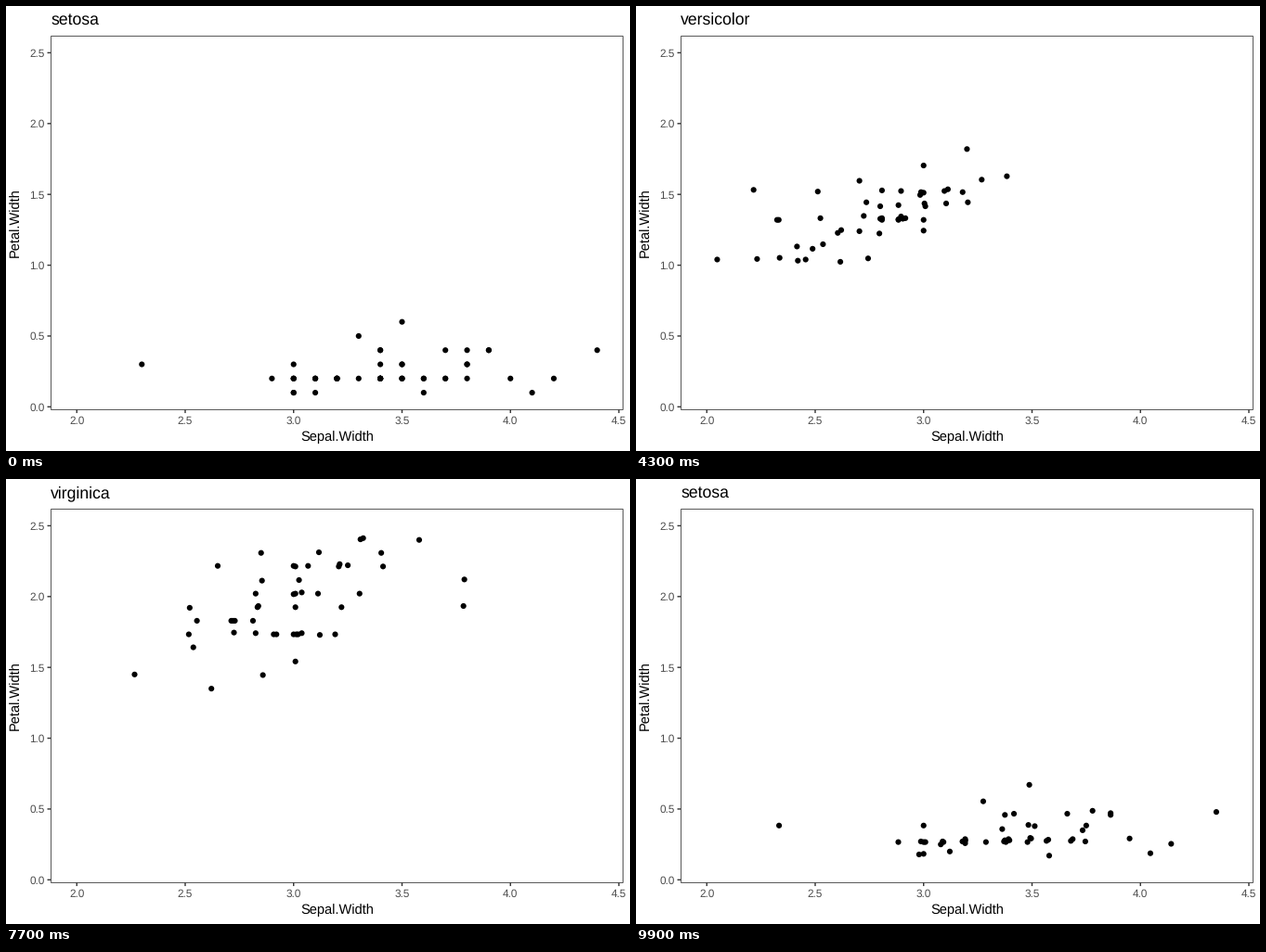
Recreate the animation shown at these times as a matplotlib script. Size 672 px wide and 480 px high, loop 10000 ms.

```python
import numpy as np
import matplotlib.pyplot as plt
from matplotlib.animation import FuncAnimation
from matplotlib.patches import Rectangle

plt.rcParams["font.family"] = "Liberation Sans"
plt.rcParams["text.hinting"] = "none"

W, H, DPI = 672, 480, 96
LEFT, RIGHT, TOP, BOTTOM = 48.2, 664.67, 32.1, 435.4
X0, X1, Y0, Y1 = 1.88, 4.52, -0.02, 2.62
FRAMES, HOLD = 100, 9
# first frame, length and species at both ends of each transition
MOVES = [(8, 25, 0, 1), (42, 25, 1, 2), (76, 24, 2, 0)]
NAMES = ["setosa", "versicolor", "virginica"]

# sepal and petal widths in tenths, one flower per column
setosa = np.array([
    [35, 30, 32, 31, 36, 39, 34, 34, 29, 31, 37, 34, 30, 30, 40, 44, 39,
     35, 38, 38, 34, 37, 36, 33, 34, 30, 34, 35, 34, 32, 31, 34, 41, 42,
     31, 32, 35, 36, 30, 34, 35, 23, 32, 35, 38, 30, 38, 32, 37, 33],
    [2, 2, 2, 2, 2, 4, 3, 2, 2, 1, 2, 2, 1, 1, 2, 4, 4,
     3, 3, 3, 2, 4, 2, 5, 2, 2, 4, 2, 2, 2, 2, 4, 1, 2,
     2, 2, 2, 1, 2, 2, 3, 3, 2, 6, 4, 3, 2, 2, 2, 2]]) / 10

versicolor = np.array([
    [32, 32, 31, 23, 28, 28, 33, 24, 29, 27, 20, 30, 22, 29, 29, 31, 30,
     27, 22, 25, 32, 28, 25, 28, 29, 30, 28, 30, 29, 26, 24, 24, 27, 27,
     30, 34, 31, 23, 30, 25, 26, 30, 26, 23, 27, 30, 29, 29, 25, 28],
    [14, 15, 15, 13, 15, 13, 16, 10, 13, 14, 10, 15, 10, 14, 13, 14, 15,
     10, 15, 11, 18, 13, 15, 12, 13, 14, 14, 17, 15, 10, 11, 10, 12, 16,
     15, 16, 15, 13, 13, 13, 12, 14, 12, 10, 13, 12, 13, 13, 11, 13]]) / 10

virginica = np.array([
    [33, 27, 30, 29, 30, 30, 25, 29, 25, 36, 32, 27, 30, 25, 28, 32, 30,
     38, 26, 22, 32, 28, 28, 27, 33, 32, 28, 30, 28, 30, 28, 38, 28, 28,
     26, 30, 34, 31, 30, 31, 31, 31, 27, 32, 33, 30, 25, 30, 34, 30],
    [25, 19, 21, 18, 22, 21, 17, 18, 18, 25, 20, 19, 21, 20, 24, 23, 18,
     22, 23, 15, 23, 20, 20, 18, 21, 18, 18, 18, 21, 16, 19, 20, 22, 15,
     14, 23, 24, 18, 18, 21, 24, 23, 19, 23, 25, 23, 19, 20, 23, 18]]) / 10

species = [setosa, versicolor, virginica]


def px(x):
    return LEFT + (x - X0) / (X1 - X0) * (RIGHT - LEFT)


def py(y):
    return BOTTOM - (y - Y0) / (Y1 - Y0) * (BOTTOM - TOP)


def points_to_px(p):
    return p * 72 / DPI


fig = plt.figure(figsize=(W / DPI, H / DPI), dpi=DPI, facecolor="white")
ax = fig.add_axes([0, 0, 1, 1])
ax.set_xlim(0, W)
ax.set_ylim(H, 0)
ax.axis("off")


def label(x, y, text, size, color="black", **kw):
    return ax.text(x, y, text, fontsize=size, color=color,
                   **{"va": "baseline", "ha": "center", **kw})


def tick(xs, ys):
    ax.plot(xs, ys, color="#333333", lw=points_to_px(1.42),
            solid_capstyle="butt", snap=False)


ax.add_patch(Rectangle((48.5, 32.5), 616, 403, fill=False, ec="#5a5a5a",
                       lw=points_to_px(1), snap=False))

for v in np.arange(2, 4.6, 0.5):
    tick([px(v)] * 2, [BOTTOM, BOTTOM + 3.67])
    label(px(v), 450.7, f"{v:.1f}", 8.8, "#4d4d4d")
for v in np.arange(0, 2.6, 0.5):
    tick([LEFT - 3.67, LEFT], [py(v)] * 2)
    label(LEFT - 6.6, py(v) + 4.2, f"{v:.1f}", 8.8, "#4d4d4d", ha="right")

label((LEFT + RIGHT) / 2, 469.2, "Sepal.Width", 11)
label(18, (TOP + BOTTOM) / 2, "Petal.Width", 11, rotation=90,
      ha="right", va="center")
title = label(LEFT, 20, "", 13.2, ha="left")

# individual sizes keep the dots at sub-pixel positions
dots = ax.scatter(np.zeros(50), np.zeros(50), s=[points_to_px(6.15) ** 2] * 50,
                  c="black", linewidths=0, zorder=3)


def state(i):
    """Positions and nearest species name at frame i."""
    for start, length, a, b in MOVES:
        if i <= start + length:
            t = max(0, (i - start) / length)
            return species[a] * (1 - t) + species[b] * t, NAMES[b if t > 0.5 else a]
        if i <= start + length + HOLD:
            return species[b], NAMES[b]


def draw(i):
    (x, y), name = state(i)
    dots.set_offsets(np.column_stack([px(x), py(y)]))
    title.set_text(name)
    return dots, title


anim = FuncAnimation(fig, draw, frames=FRAMES, interval=100,
                     repeat=True, repeat_delay=0, blit=False)
plt.show()
```
